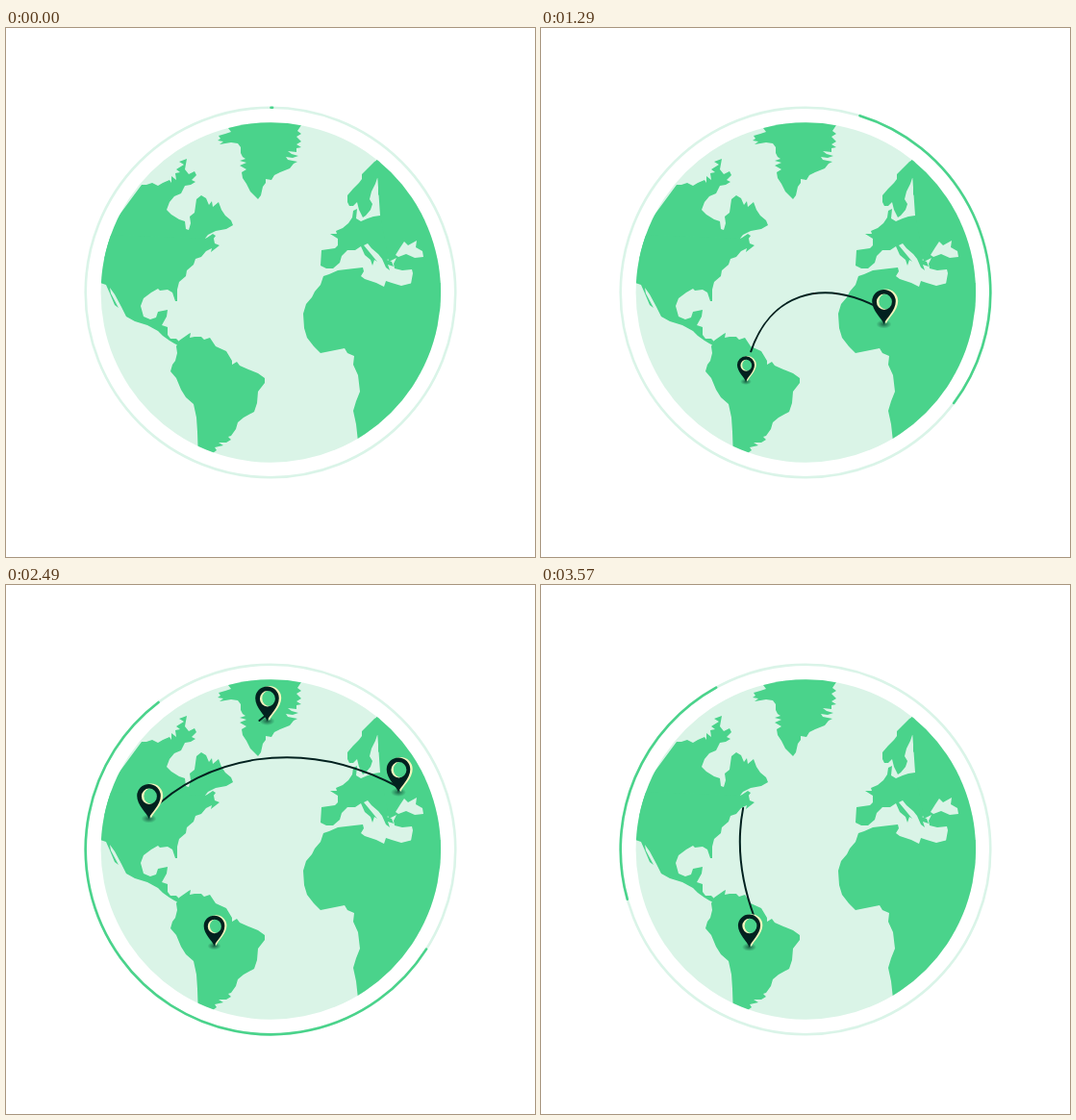
Write an HTML page that moves like this. It is 550 px wide and 550 px high and loops after 3.6 s.

```html
<!DOCTYPE html>
<html lang="en">
<head>
<meta charset="utf-8">
<title>Connected globe</title>
<style>
  html, body { margin: 0; width: 100%; height: 100%; overflow: hidden; background: #fff; }
  svg { display: block; width: 100vw; height: 100vh; }
  .land { fill: #4ad38b; }
  .sea { fill: #daf4e7; }
  .ring { fill: none; stroke: #daf4e8; stroke-width: 2.6; }
  #arc { stroke: #4ad38b; stroke-linecap: round; }
  #routes { fill: none; stroke: #02211f; stroke-width: 2; stroke-linecap: round; }
</style>
</head>
<body>
<svg viewBox="0 0 550 550">
  <defs>
    <clipPath id="globe"><circle cx="275.3" cy="275" r="176.7"/></clipPath>
    <radialGradient id="shade">
      <stop offset="0" stop-color="#02211f" stop-opacity=".6"/>
      <stop offset="1" stop-color="#02211f" stop-opacity="0"/>
    </radialGradient>
    <path id="drop" fill-rule="evenodd" d="M0 18C-2 12-12.3 4-12.3-5.7A12.3 12.3 0 0 1 12.3-5.7C12.3 4 2 12 0 18ZM-7.6-5.2a8 8.2 0 0 0 16 0a8 8.2 0 0 0-16 0Z"/>
    <g id="pin">
      <ellipse cy="18" rx="8" ry="4.5" fill="url(#shade)"/>
      <use href="#drop" x="2.4" y="-.4" fill="#f3f6bd"/>
      <use href="#drop" fill="#02211f"/>
    </g>
  </defs>

  <circle class="ring" cx="275" cy="275" r="192.3"/>
  <circle class="ring" id="arc" cx="275" cy="275" r="192.3" pathLength="360"/>
  <circle class="sea" cx="275.3" cy="275" r="176.7"/>

  <g class="land" clip-path="url(#globe)">
    <!-- Greenland -->
    <path d="M231 90V104L234 108 228 110 221 112 223 115 220 117 226 118 222 121 234 119 241 120 244 124 244 130 246 134 249 136 243 138 250 140 243 143 250 147 245 150 246 156 250 162 254 170 262 178 265 174 267 165 270 161 270 157 276 158 279 153 285 150 295 146 299 141 303 139 293 137 291 134 298 135 304 133 297 131 293 128 302 129 302 125 307 124 302 121 307 118 302 113 307 110 303 107 307 101V90Z"/>
    <!-- Northern America -->
    <path d="M141 163L146 163 152 161 158 164 163 161 170 158 172 161 172 154 177 158 176 151 181 150 177 147 185 142 180 139 188 136 186 147 190 152 196 149 198 153 193 158 197 160 192 163 186 164 182 172 175 175 170 181 167 189 172 194 180 199 186 201 187 209 190 210 192 203 191 196 196 192 197 185 198 178 203 174 208 177 211 184 214 180 215 186 221 181 224 189 228 195 234 200 236 205 229 209 218 211 210 215 206 220 215 214 218 216 215 220 208 226 100 240 110 205Z"/>
    <path d="M216 219L217 224 222 226 213 233 214 229 208 232 203 238 197 240 195 246 188 252 187 258 180 264 178 272 178 284 176 284 173 275 168 272 160 273 158 271 151 275 143 281 140 289 143 300 150 303 156 301 158 295 168 293 167 300 162 309 168 311 168 319 171 323 177 323 181 327 179 330 175 328 170 325 163 320 158 315 147 309 134 305 125 300 120 290 113 277 108 270 109 276 117 291 113 288 108 276 104 267 95 264 90 230 110 215Z"/>
    <!-- South America -->
    <path d="M177 331L180 325 190 318 192 317 191 322 196 321 203 321 206 324 212 322 218 331 229 336 235 346 235 350 240 347 243 351 252 355 262 359 269 364 269 369 262 378 261 390 258 399 247 405 241 410 239 417 234 424 231 425 234 428 229 431 221 431 226 434 217 436 219 439 215 442 210 450H200L199 420 198 405 195 391 187 384 182 376 177 364 171 357 173 350 176 346 178 338Z"/>
    <!-- Europe -->
    <path d="M388 136L383 139 376 146 370 152 370 157 367 161 361 167 355 174 355 181 357 185 361 185 365 181 367 189 371 197 374 195 379 189 381 183 378 178 380 170 384 162 386 156 391 157 387 165 387 173 392 179 396 175 404 177 398 180 390 183 393 189 389 195 382 196 376 198 369 201 364 198 365 188 361 190 360 197 356 203 350 208 343 211 344 214 337 214 345 219 345 226 342 229 328 231 327 247 333 250 340 250 347 244 349 237 355 231 363 231 369 227 373 236 379 241 381 247 383 241 386 243 377 232 372 226 376 224 380 229 387 235 391 240 395 249 399 252 397 246 403 248 401 243 396 241 403 238Z"/>
    <!-- Western Asia -->
    <path d="M385 137L389 195 398 243 406 239 403 245 404 250 412 252 422 251 423 255 421 266 418 285 470 300 470 180Z"/>
    <!-- Africa -->
    <path d="M423 265L411 268 401 265 395 263 393 269 385 265 373 261 369 258 372 253 371 249 362 250 345 252 336 256 330 258 327 267 321 274 318 280 312 287 309 297 310 312 313 322 320 331 327 338 337 336 352 333 355 338 362 341 361 350 366 361 368 378 364 388 361 398 364 412 366 430 470 430 470 265Z"/>
    <!-- Black Sea -->
    <path class="sea" d="M405 236L410 228 414 222 418 226 427 221 426 228 433 232 434 238 425 239 416 235 408 238Z"/>
  </g>
  <g id="routes"></g>
  <g id="pins"></g>
</svg>
<script>
const LOOP = 3600;
const GROW = 200, SHRINK = 180, DRAW = 400, ERASE = 640;

// path, draw time, erase time
const routes = [
  ['M214 352C228 285 283 252 357 294', 450, 1175],
  ['M150 236C205 180 305 155 408 210', 1846, 2600],
  ['M271 135C210 180 190 260 222 346', 2442, 3250]
];

// x, y, appear time, vanish time
const pins = [
  [213, 354.5, 250, 1230],
  [356.5, 290, 400, 1540],
  [148.5, 225, 1600, 2600],
  [408, 197.5, 1720, 2860],
  [271.5, 123.5, 2240, 3240],
  [216.5, 359.5, 2334, 3545]
];

// time, tail angle, head angle
const sweep = [
  [0, 0, 0], [300, 45, 190], [540, 147, 318], [870, 299.2, 358.2],
  [1000, 360, 360], [1080, 361, 392], [1290, 376.9, 486.3],
  [1620, 441, 630], [1950, 529.2, 691.4], [2190, 720, 720],
  [2490, 842, 1042.6], [2700, 970, 1072], [2860, 1080, 1080],
  [3060, 1088, 1290], [3270, 1131.9, 1379.2], [3570, 1333.7, 1411],
  [3600, 1355, 1414]
];

const add = (tag, parent, attrs) => {
  const node = document.createElementNS('http://www.w3.org/2000/svg', tag);
  for (const key in attrs) node.setAttribute(key, attrs[key]);
  return document.getElementById(parent).appendChild(node);
};
const ease = (t, start, duration) => {
  const p = Math.min(1, Math.max(0, (t - start) / duration));
  return p * p * (3 - 2 * p);
};
const showDash = (node, from, to) => {
  node.style.visibility = to - from > 0.001 ? 'visible' : 'hidden';
  node.setAttribute('stroke-dasharray', `${to - from} 9999`);
  node.setAttribute('stroke-dashoffset', -from);
};

const arc = document.getElementById('arc');
const routeNodes = routes.map(([d]) => add('path', 'routes', { d, pathLength: 1000 }));
const pinNodes = pins.map(() => add('use', 'pins', { href: '#pin' }));

function drawArc(t) {
  const i = sweep.findIndex(key => key[0] > t);
  const [a, b] = [sweep[i - 1], sweep[i]];
  const p = (t - a[0]) / (b[0] - a[0]);
  const tail = a[1] + (b[1] - a[1]) * p;
  const head = a[2] + (b[2] - a[2]) * p;
  arc.setAttribute('transform', `rotate(${tail - 90} 275 275)`);
  showDash(arc, 0, head - tail);
}

function draw(t) {
  drawArc(t);
  routes.forEach(([, start, end], i) =>
    showDash(routeNodes[i], 1000 * ease(t, end, ERASE), 1000 * ease(t, start, DRAW)));
  pins.forEach(([x, y, start, end], i) => {
    const scale = ease(t, start, GROW) - ease(t, end, SHRINK);
    pinNodes[i].setAttribute('transform', `translate(${x} ${y}) scale(${scale})`);
  });
}

const begin = performance.now();
function tick() {
  draw((performance.now() - begin) % LOOP);
  requestAnimationFrame(tick);
}
tick();
</script>
</body>
</html>
```
